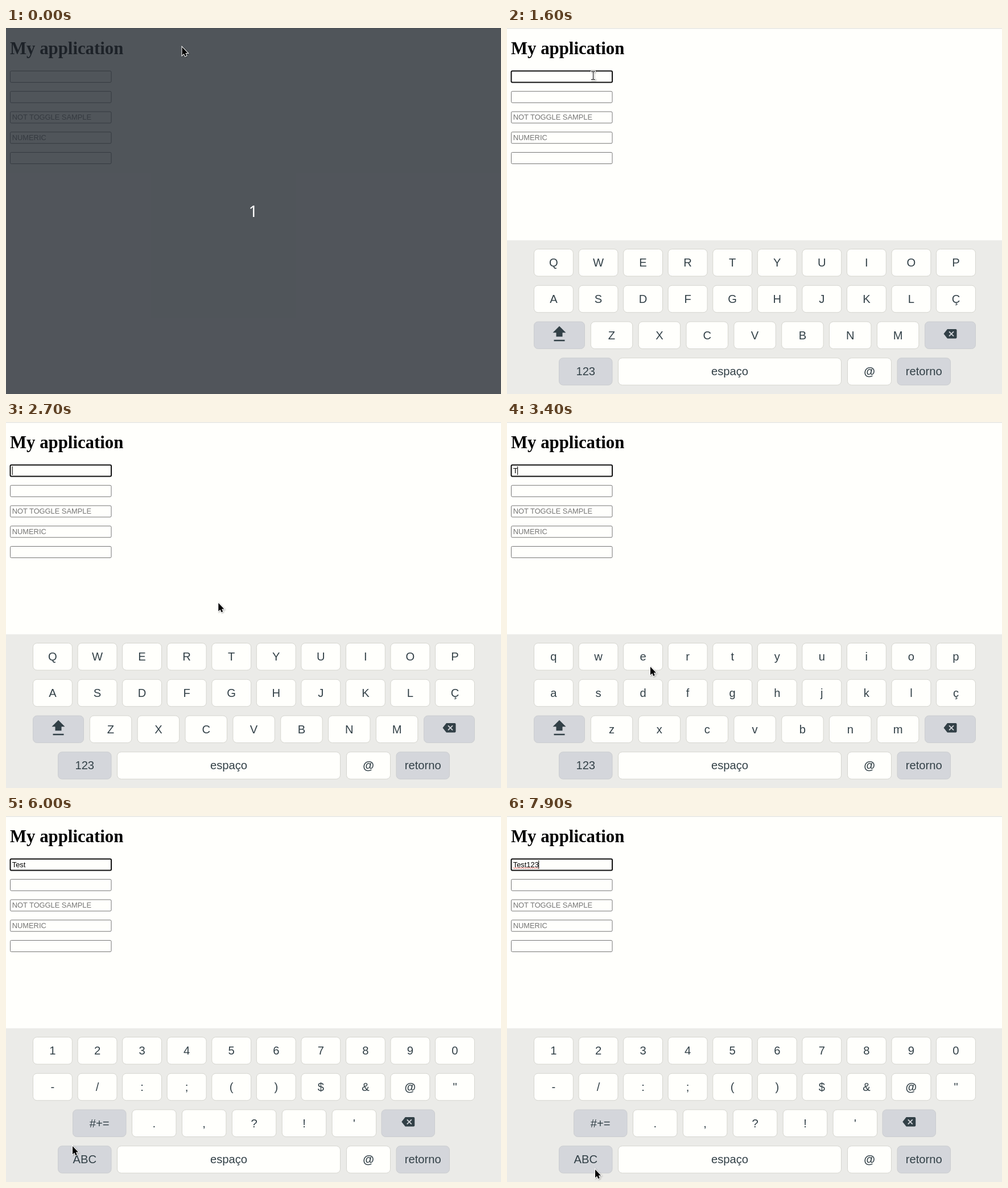
An HTML page for the animation above (8 s loop, 870 px wide and 643 px high).

```html
<!DOCTYPE html>
<html lang="en">
<head>
<meta charset="utf-8">
<title>Touch keyboard demo</title>
<style>
  html, body { margin: 0; width: 100%; height: 100%; overflow: hidden; background: #fffffc; }
  svg { display: block; width: 870px; height: 643px; }
  text { font-family: "Liberation Sans", Arial, sans-serif; white-space: pre; }
  h1, .title { font: bold 30.8px "Liberation Serif", serif; }
  .field { fill: #fffffc; stroke: #767676; }
  .field.hover { stroke: #4a4a4a; }
  .field.focus { stroke: #101010; stroke-width: 2; }
  .input { font-size: 12.85px; }
  .hint { fill: #757575; }
  .key rect { fill: #fffffc; stroke: #d5d5cf; }
  .key text { font-size: 20.2px; fill: #324047; text-anchor: middle; }
  .key .at { font-weight: bold; }
  .key .icon { fill: #324047; }
  .key .cross { stroke: #d4d6db; stroke-width: 1.8; }
  .key.gray rect { fill: #d4d6db; stroke: #cbcdd0; }
  .key.down rect { stroke: #444; }
  .key.down text { font-size: 23.5px; fill: #000; }
  .count { font: 28px "Noto Sans", sans-serif; fill: #fff; text-anchor: middle; }
  #cursor { filter: drop-shadow(1px 1px 1px rgba(0, 0, 0, .3)); }
  #cursor path { paint-order: stroke; stroke: #fff; stroke-width: 2; }
</style>
</head>
<body>
<svg id="stage" viewBox="0 0 870 643">
  <rect width="870" height="643" fill="#fffffc"/>
  <rect width="870" height="1.5" fill="#e5e5e2"/>
  <text class="title" x="7" y="46">My application</text>
  <g id="fields"></g>
  <text id="typed" class="input" x="10.8" y="89.8"></text>
  <path id="squiggle" fill="none" stroke="#e8403a" stroke-width=".9"/>
  <rect id="caret" y="78" width="1" height="15"/>
  <g id="keyboard"><rect y="373" width="870" height="270" fill="#ebebe8"/></g>
  <g id="overlay">
    <rect width="870" height="643" fill="rgb(37,43,51)" fill-opacity=".8"/>
    <text class="count" x="434.5" y="332">1</text>
  </g>
  <g id="cursor">
    <path id="arrow" d="M0 0V14.5L3.2 11.6 5.4 16.2 7.8 15.1 5.8 10.6H10Z"/>
    <path id="beam" d="M-3.5-7.5H-1L0-7 1-7.5H3.5V-6.5H1L.5-6V6L1 6.5H3.5V7.5H1L0 7-1 7.5H-3.5V6.5H-1L-.5 6V-6L-1-6.5H-3.5Z"/>
  </g>
</svg>
<script>
const LOOP = 8000, STEP = 100, FOCUS = 1600;

// Presses on the on-screen keys: the text and layout change on release.
const presses = [
  { key: 'T', down: 3000, up: 3100 },
  { key: 'e', down: 3600, up: 3700 },
  { key: 's', down: 3800, up: 3900 },
  { key: 't', down: 4900, up: 5100 },
  { key: '123', down: 5700, up: 5800 },
  { key: '1', down: 6600, up: 6700 },
  { key: '2', down: 7000, up: 7100 },
  { key: '3', down: 7500, up: 7600 },
];

// Pointer path: time, x, y
const path = [
  [0, 309.5, 33.5], [600, 309.5, 33.5], [700, 305.5, 41], [800, 305.5, 41],
  [900, 303.5, 44], [1000, 303.5, 44], [1200, 205, 86], [1300, 151.5, 83.5],
  [2100, 151.5, 83.5], [2300, 250, 165], [2500, 366, 267], [2600, 366, 267],
  [2900, 388, 420], [3100, 388, 424], [3400, 252, 430], [3500, 252, 430],
  [3700, 244, 426], [3800, 165, 476], [4000, 165, 480], [4400, 361, 467],
  [4600, 370, 441], [4700, 370, 441], [4800, 386, 428], [5100, 386, 428],
  [5600, 140, 590], [5800, 132, 600], [6000, 117, 580], [6200, 36, 500],
  [6400, 80, 432], [6700, 84, 428], [7000, 165, 428], [7100, 165, 428],
  [7400, 228, 431], [7600, 232, 430], [7700, 221, 433], [7800, 221, 433],
  [7900, 155, 621],
];

const $ = id => document.getElementById(id);

function add(parent, tag, attrs = {}, text = '') {
  const node = document.createElementNS('http://www.w3.org/2000/svg', tag);
  for (const name in attrs) node.setAttribute(name, attrs[name]);
  node.textContent = text;
  return parent.appendChild(node);
}

const show = (node, on) => node.style.display = on ? '' : 'none';

['', '', 'NOT TOGGLE SAMPLE', 'NUMERIC', ''].forEach((hint, i) => {
  const y = 75.5 + i * 35.75;
  add($('fields'), 'rect', { class: 'field', x: 7.5, y, width: 177.5, height: 20, rx: 2 });
  add($('fields'), 'text', { class: 'input hint', x: 10.8, y: y + 14.3 }, hint);
});
const field = $('fields').firstChild;

function addKey(group, label, x, row, width, gray) {
  const y = 388.5 + row * 63.75, middle = x + width / 2;
  const key = add(group, 'g', { class: gray ? 'key gray' : 'key', 'data-key': label });
  add(key, 'rect', { x, y, width, height: 47.5, rx: 7 });
  if (label === 'shift' || label === 'delete') {
    const icon = add(key, 'g', { transform: `translate(${middle} ${y + 21.3})` });
    if (label === 'shift') {
      add(icon, 'path', { class: 'icon', d: 'M0-13.5L11.5-2H5.5V5H-5.5V-2H-11.5ZM-9.5 10.5H9.5V13H-9.5Z' });
    } else {
      add(icon, 'path', { class: 'icon', d: 'M-11.5 0L-5-8.3H9.5Q11.5-8.3 11.5-6.3V6.3Q11.5 8.3 9.5 8.3H-5Z' });
      add(icon, 'path', { class: 'cross', d: 'M-2-4L6 4M6-4L-2 4' });
    }
  } else {
    add(key, 'text', { class: label === '@' ? 'at' : 'label', x: middle, y: y + 30.7 }, label);
  }
}

function addLayout(rows, third, left, mode) {
  const group = add($('keyboard'), 'g');
  const addRow = (labels, row, x, pitch, width) =>
    [...labels].forEach((label, i) => addKey(group, label, x + i * pitch, row, width));
  addRow(rows[0], 0, 47.5, 78.56, 68.9);
  addRow(rows[1], 1, 47.5, 78.56, 68.9);
  addRow(rows[2], 2, third.x, third.pitch, third.pitch - 10.4);
  addKey(group, left, third.edge, 2, third.side, true);
  addKey(group, 'delete', 871 - third.edge - third.side, 2, third.side, true);
  addKey(group, mode, 91.5, 3, 93.5, true);
  addKey(group, 'espaço', 195.5, 3, 392);
  addKey(group, '@', 598.5, 3, 77);
  addKey(group, 'retorno', 686, 3, 93.5, true);
  return group;
}

const letters = ['qwertyuiop', 'asdfghjklç', 'zxcvbnm'];
const letterRow = { x: 147.3, pitch: 83.85, edge: 47.5, side: 89 };
const symbolRow = { x: 221.5, pitch: 87.9, edge: 117.5, side: 93.5 };
const layouts = {
  upper: addLayout(letters.map(row => row.toUpperCase()), letterRow, 'shift', '123'),
  lower: addLayout(letters, letterRow, 'shift', '123'),
  symbols: addLayout(['1234567890', '-/:;()$&@"', ".,?!'"], symbolRow, '#+=', 'ABC'),
};

function pointerAt(t) {
  const next = path.findIndex(point => point[0] > t);
  if (next < 0) return path[path.length - 1].slice(1);
  const [t0, x0, y0] = path[next - 1], [t1, x1, y1] = path[next];
  const k = (t - t0) / (t1 - t0);
  return [x0 + (x1 - x0) * k, y0 + (y1 - y0) * k];
}

function layoutAt(t) {
  if (t < presses[0].up) return 'upper';
  return t < presses.find(p => p.key === '123').up ? 'lower' : 'symbols';
}

function render(t) {
  show($('overlay'), t < 500);
  show($('keyboard'), t >= FOCUS);
  field.setAttribute('class', t >= FOCUS ? 'field focus' : t >= 1300 ? 'field hover' : 'field');

  const current = layoutAt(t);
  for (const name in layouts) show(layouts[name], name === current);
  const held = presses.find(p => t >= p.down && t < p.up);
  for (const key of layouts[current].children) {
    key.classList.toggle('down', !!held && key.dataset.key === held.key);
  }

  const entered = presses.filter(p => p.key.length === 1 && t >= p.up);
  $('typed').textContent = entered.map(p => p.key).join('');
  const width = entered.length ? $('typed').getComputedTextLength() : 0;

  // The caret blinks every half second and restarts with each character.
  const restart = entered.length ? entered[entered.length - 1].up : 1700;
  show($('caret'), t >= FOCUS && Math.floor((t - restart) / 500) % 2 === 0);
  $('caret').setAttribute('x', 10.8 + width - (entered.length ? .5 : 0));

  const waves = Array.from({ length: Math.floor(width / 2) }, (_, i) => `l2 ${i % 2 ? -1.5 : 1.5}`);
  $('squiggle').setAttribute('d', 'M11 90.7' + waves.join(''));
  show($('squiggle'), t >= 7600);

  const overText = t >= 1300 && t < 2200;
  show($('arrow'), !overText);
  show($('beam'), overText);
  $('cursor').setAttribute('transform', `translate(${pointerAt(t)})`);
}

const start = performance.now();
function tick() {
  const elapsed = (performance.now() - start) % LOOP;
  render(Math.floor(elapsed / STEP) * STEP);
  requestAnimationFrame(tick);
}
tick();
</script>
</body>
</html>
```
